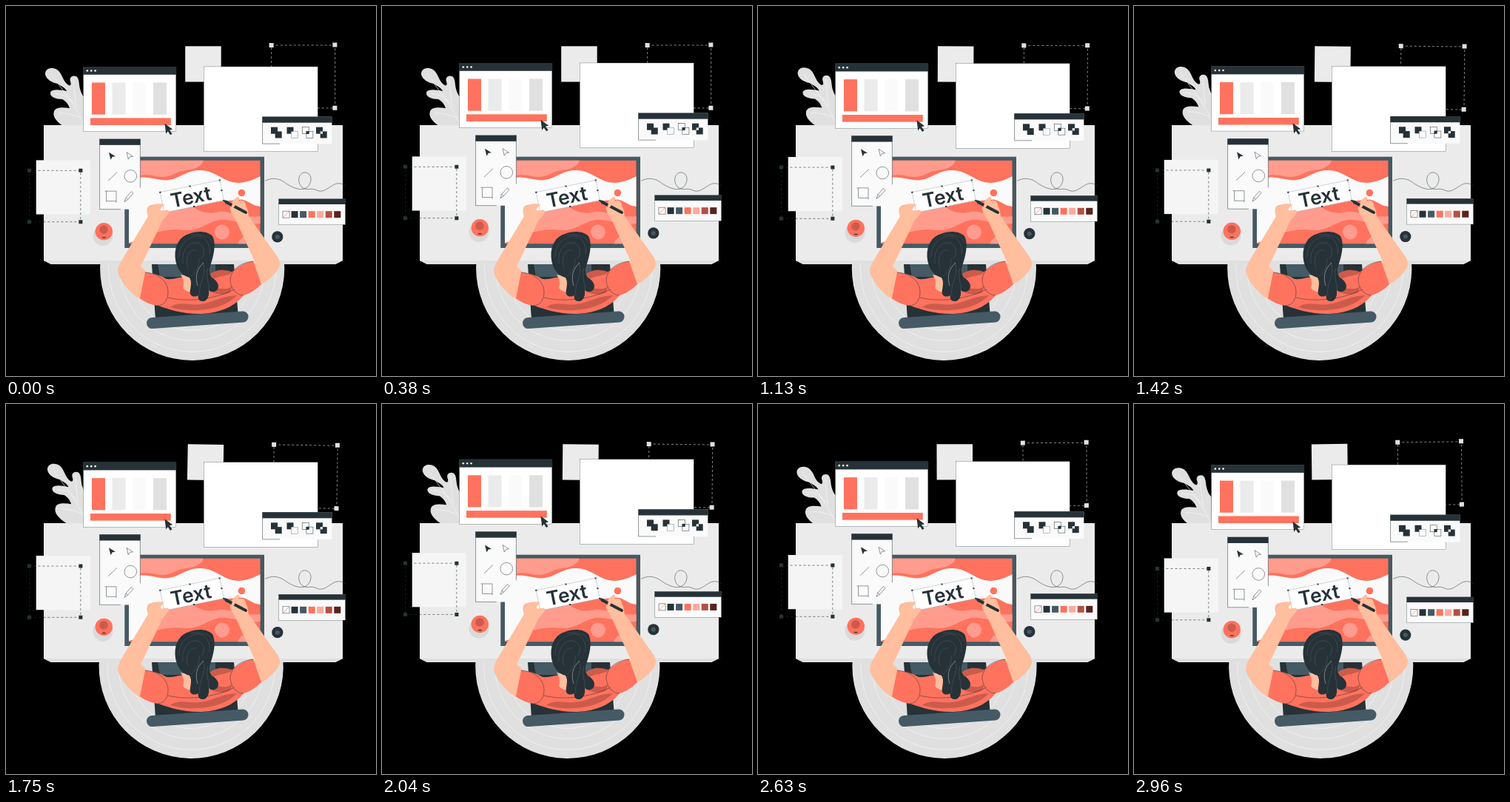
An HTML page that plays this animation: 500x500 px, repeating every 3000 ms.

```html
<!DOCTYPE html>
<html lang="en">
<head>
<meta charset="utf-8">
<title>Designer at work</title>
<style>
html, body { margin: 0; width: 100%; height: 100%; overflow: hidden; background: #000; }
svg { display: block; width: 100vw; height: 100vh; }
.dark { fill: #263238; }
.slate { fill: #455a64; }
.coral { fill: #ff725e; }
.salmon { fill: #ff9c8e; }
.brick { fill: #cc5b4b; }
.skin { fill: #ffbe9d; }
.grey { fill: #e0e0e0; }
.pale { fill: #ebebeb; }
.paper { fill: #fafafa; }
.white { fill: #fff; }
.line { fill: none; stroke: #263238; stroke-width: .5; }
.vein { fill: none; stroke: #f5f5f5; stroke-width: .7; }
.strand { fill: none; stroke: #56666e; stroke-width: .45; }
.edge { stroke: #263238; stroke-width: .3; }
.dash { fill: none; stroke-width: .6; stroke-dasharray: 3 3; }
</style>
</head>
<body>
<svg viewBox="0 0 500 500">
<defs>
  <clipPath id="screen"><rect x="166" y="208.7" width="177.5" height="112.5"/></clipPath>
  <rect id="sq" width="9" height="9"/>
</defs>

<g id="wind">
  <circle class="grey" cx="251.7" cy="354.3" r="124.6"/>
  <g class="vein">
    <circle cx="251.7" cy="354.3" r="113"/>
    <circle cx="251.7" cy="354.3" r="98"/>
    <circle cx="251.7" cy="354.3" r="84"/>
  </g>
  <path class="grey" d="M80 164C70 158 62 150 65 142C68 136 78 137 86 138C84 132 80 128 76 126C68 126 59 123 60 117C62 112 72 113 82 115C80 110 74 108 70 105C64 104 54 100 53 92C53 84 62 82 69 86C76 91 76 99 82 105C86 109 89 108 87 102C85 96 90 93 95 95C100 99 98 108 101 115C103 122 106 122 106 125V164Z"/>
  <path class="vein" d="M61 92C74 112 90 126 105 159M67 119C77 119 86 122 92 132M71 145C82 144 92 147 101 151M91 99C92 110 93 122 95 136"/>
  <rect class="pale" x="242.2" y="54.3" width="48.5" height="48.2"/>
  <rect class="dash" x="358.7" y="53" width="86" height="85" stroke="#e0e0e0"/>
  <path class="grey" d="M355.6 50h6v6h-6zM441.4 49.5h6v6h-6zM441.4 134.8h6v6h-6z"/>
</g>

<path class="pale" d="M51 161H455V344L445 349H61L51 344Z"/>
<path class="grey" d="M51 344H455L445 349H61Z"/>
<path class="line" d="M350 236.500C358 232 367 232 376 238C388 247 406 254 411.500 238C414 229 408 224 402 225C395 227 393 238 400 245C406 250 412 245 420 249C430 254 438 242 447 240C452 239 456 241 459 243"/>

<rect class="slate" x="160.3" y="203.7" width="188.7" height="123.3"/>
<g clip-path="url(#screen)">
  <rect class="coral" x="166" y="208" width="178" height="114"/>
  <path class="salmon" d="M166 208H267C265 217 254 221 243 222C230 223 224 232 209 231C196 229 190 225 166 233Z"/>
  <path class="paper" d="M166 237C184 227 196 233 210 235C230 238 240 223 260 222C284 221 293 239 315 239C329 238 337 233 344 230V271C330 270 326 259 311 262C288 266 274 255 256 268C244 279 230 272 218 280C203 290 200 304 187 311C179 316 174 318 166 320Z"/>
  <path class="salmon" d="M216 281C221 261 240 260 252 270C263 280 275 281 288 278C302 276 315 287 344 284V294C318 297 300 285 284 290C270 294 260 304 242 303C224 301 213 304 203 306C192 309 186 314 178 322H166C184 315 208 304 216 281Z"/>
  <path class="salmon" d="M313 322C316 311 327 307 344 309V322Z"/>
  <circle class="salmon" cx="292" cy="305.5" r="10"/>
  <circle class="coral" cx="318.4" cy="252.5" r="4.8"/>
  <circle class="coral" cx="332" cy="275" r="2"/>
</g>

<g transform="translate(251.3 257.3) rotate(-11.5)">
  <rect class="white" x="-41" y="-14" width="82" height="28" stroke="#a5adb1" stroke-width=".5"/>
  <path class="dark" d="M-42-15h2v2h-2zM-1-15h2v2h-2zM40-15h2v2h-2zM40-1h2v2h-2zM40 13h2v2h-2zM-1 13h2v2h-2z"/>
  <text class="dark" x="-1.500" y="9.700" text-anchor="middle" font-family="Inter, Lato, sans-serif" font-weight="600" font-size="26.5">Text</text>
</g>

<!-- chair -->
<path class="dark" d="M197 349H308L314 420L202 424Z"/>
<path class="slate" d="M205 349H283V366H208Z"/>

<path d="M197.5 428.5L320 420" stroke="#455a64" stroke-width="15" stroke-linecap="round"/>

<!-- arms and hands -->
<path class="skin" d="M192 284C189 276 190 270 196 269C203 267 209 267 214 268C212 271 208 273 209 276C212 278 219 273 220 277C220 282 215 285 211 291L182 352L194 363L184 398C170 390 158 377 152 363C150 357 152 351 155 346Z"/>
<path class="skin" d="M304 270C305 264 309 260 313 258C316 257 316 261 314 264C319 261 324 264 324 270C327 274 327 279 328 284L367 339C371 346 371 351 367 357C361 365 354 371 344 377L328 356L336 345L310 288C305 280 301 276 304 270Z"/>
<path d="M297.5 265L324 279" stroke="#263238" stroke-width="4" stroke-linecap="round"/>
<path class="dark" d="M293.5 262L299 263L297 267Z"/>
<path class="skin" d="M305 270C306 265 311 263 314 264C313 267 309 269 308 272C307 274 304 273 305 270Z"/>

<!-- shirt -->
<path class="brick" d="M276 362C286 355 296 356 307 360L304 378H276Z"/>
<path class="coral" d="M188 360C202 361 210 365 217 369C226 370 235 366 244 366L282 368C290 365 298 364 303 362C312 352 322 347 334 344.5L345 376C337 384 329 389 321 391C308 408 284 416 260 416C239 416 220 410 206 405C196 404 187 400 181 395Z"/>
<path class="brick" d="M222 407C234 398 249 405 262 403C280 401 290 392 312 391C300 404 280 410 260 411C246 412 232 410 222 407ZM276 386C285 376 296 387 305 379C305 384 303 388 298 389C290 391 283 389 276 386Z"/>
<path class="line" d="M188 360C207 361 219 373 219 387C219 398 213 404 206 405M334 345C315 347 303 358 303 371C304 383 312 391 321 391M219 394C242 400 278 398 309 383"/>
<path class="skin" d="M236 363L261 368L258 384C252 389 244 387 239 381C241 375 240 369 236 363Z"/>

<!-- hair -->
<path class="dark" d="M228.5 338C228 322 236 311 247 308C258 303 273 304 279 311C284 320 281 335 278 345C276 352 272 358 278 367C285 371 289 377 286 383C282 388 276 386 274 384C275 392 272 399 266 399C260 399 259 394 260 391C253 395 247 391 249 384C250 377 251 372 248 367C236 364 229 352 228.500 338Z"/>
<path class="strand" d="M234 340C234 322 244 313 258 311C269 311 277 321 275 335M239 348C237 329 247 319 258 320C268 322 270 334 264 341M246 354C241 339 249 328 257 330M250 309C262 309 275 309 279 320M250 365C258 358 262 350 261 340M273 354C269 364 275 376 274 384M265 346C274 361 259 373 262 391"/>
<path d="M267 347C256 357 256 368 259 378" fill="none" stroke="#cfd4d6" stroke-width=".5"/>

<g id="float">
  <!-- browser window -->
  <rect class="white edge" x="104.5" y="82.5" width="125.3" height="87.3"/>
  <rect class="dark" x="104.2" y="82.3" width="126" height="10.8"/>
  <g class="white">
    <circle cx="109.8" cy="87.8" r="1.3"/><circle cx="115.2" cy="87.8" r="1.3"/><circle cx="120.6" cy="87.8" r="1.3"/>
  </g>
  <rect class="coral" x="116" y="103.8" width="18" height="43.2"/>
  <rect class="pale" x="143.5" y="103.8" width="18" height="43.2"/>
  <rect class="paper" x="171" y="103.8" width="18" height="43.2"/>
  <rect class="grey" x="199" y="103.8" width="18" height="43.2"/>
  <rect class="coral" x="114" y="151.7" width="108.8" height="9.6"/>
  <path class="dark" d="M214.5 159L225.2 167L221 168L224.6 173L222 174.6L218.8 169.6L216.2 173Z"/>

  <rect class="white edge" x="267.3" y="82.3" width="154" height="114.7"/>

  <!-- shape modes -->
  <rect class="paper" x="346.6" y="150" width="93.8" height="36.7"/>
  <path class="line" d="M346.6 150V186.500H370"/>
  <rect class="dark" x="346.4" y="149.8" width="94.2" height="8.2"/>
  <g class="dark">
    <use href="#sq" x="358" y="164"/><use href="#sq" x="363.7" y="169.8"/>
    <use href="#sq" x="379.5" y="164"/><use href="#sq" x="385.2" y="169.8" class="paper edge"/>
    <use href="#sq" x="400.2" y="164" class="line"/><use href="#sq" x="405.9" y="169.8" class="line"/>
    <rect x="405.7" y="169.5" width="3.8" height="3.8"/>
    <use href="#sq" x="419" y="164"/><use href="#sq" x="424.7" y="169.8"/>
    <rect class="paper" x="424.7" y="169.8" width="3.3" height="3.2"/>
  </g>

  <!-- swatches -->
  <rect class="paper edge" x="368.8" y="261.2" width="89.8" height="34.6"/>
  <rect class="dark" x="368.5" y="261" width="90.4" height="7.3"/>
  <g id="swatches"></g>
  <path d="M374 286.5l9-9" stroke="#ff725e" stroke-width=".7"/>

  <!-- tools -->
  <rect class="paper" x="126.6" y="180.1" width="54.8" height="95"/>
  <path class="line" d="M126.6 180V275H155M181.400 180V246"/>
  <rect class="dark" x="126.4" y="179.9" width="55.2" height="8.3"/>
  <path class="dark" d="M139 198L148 203.5L143.8 204L141.5 208Z"/>
  <path class="line" d="M163 198L171.5 203.5L167.5 204L165.3 207.5ZM138 236.5L150 225M135.5 250.5h13.5v13.5h-13.5zM133.5 250.5h2M149 264v2M160 265L162 259.5L169.5 251L172 253.5L164.5 262ZM162 259.5L164.5 262"/>
  <circle class="line" cx="168.3" cy="230.2" r="8.3"/>

  <!-- selected square -->
  <rect x="40.7" y="208.7" width="73.3" height="73.2" fill="#f5f5f5"/>
  <rect class="dash" x="31.5" y="222.7" width="69.3" height="69.3" stroke="#263238"/>
  <path class="dark" d="M29 220.2h5v5h-5zM98.4 220.2h5v5h-5zM29 289.5h5v5h-5zM98.4 289.5h5v5h-5z"/>

  <!-- cup and dial -->
  <circle cx="131" cy="310.8" r="13.5" fill="#dadada"/>
  <circle class="coral" cx="132.3" cy="305" r="11.7"/>
  <circle class="brick" cx="132" cy="302.5" r="5.8"/>
  <path d="M129.8 313.2h5" stroke="#263238" stroke-width="1.2"/>
  <circle class="dark" cx="366.8" cy="312.3" r="7.6"/>
  <circle class="slate" cx="366.8" cy="312.3" r="3"/>
</g>
</svg>
<script>
const byId = id => document.getElementById(id);
const LOOP = 3000, FPS = 24, LEAD = 25;

byId('swatches').innerHTML = ['#fff', '#263238', '#455a64', '#ff725e', '#ffaa9e', '#b54f43', '#59231e']
  .map((fill, i) => `<use href="#sq" x="${374 + i * 11.55}" y="277.5" fill="${fill}" stroke="#263238" stroke-width="${i ? 0 : .5}"/>`)
  .join('');

function draw(now) {
  const step = Math.floor((now % LOOP) * FPS / 1000 + .1);
  const t = step * 1000 / FPS + LEAD;

  // panels rise and sink by 10 px every 1.5 s
  const p = t / 1500 % 1;
  const lift = 10 * (1 - Math.abs(1 - 2 * p));
  byId('float').setAttribute('transform', `translate(0 ${-lift})`);

  // backdrop sways one degree each way after a second of rest
  const u = Math.max(0, (t - 1000) / 3000);
  const angle = u < .25 ? 4 * u : 2 - 4 * u;
  byId('wind').setAttribute('transform', `rotate(${angle} 250 264)`);
}

const start = performance.now();
function tick() {
  draw(performance.now() - start);
  requestAnimationFrame(tick);
}
tick();
</script>
</body>
</html>
```
